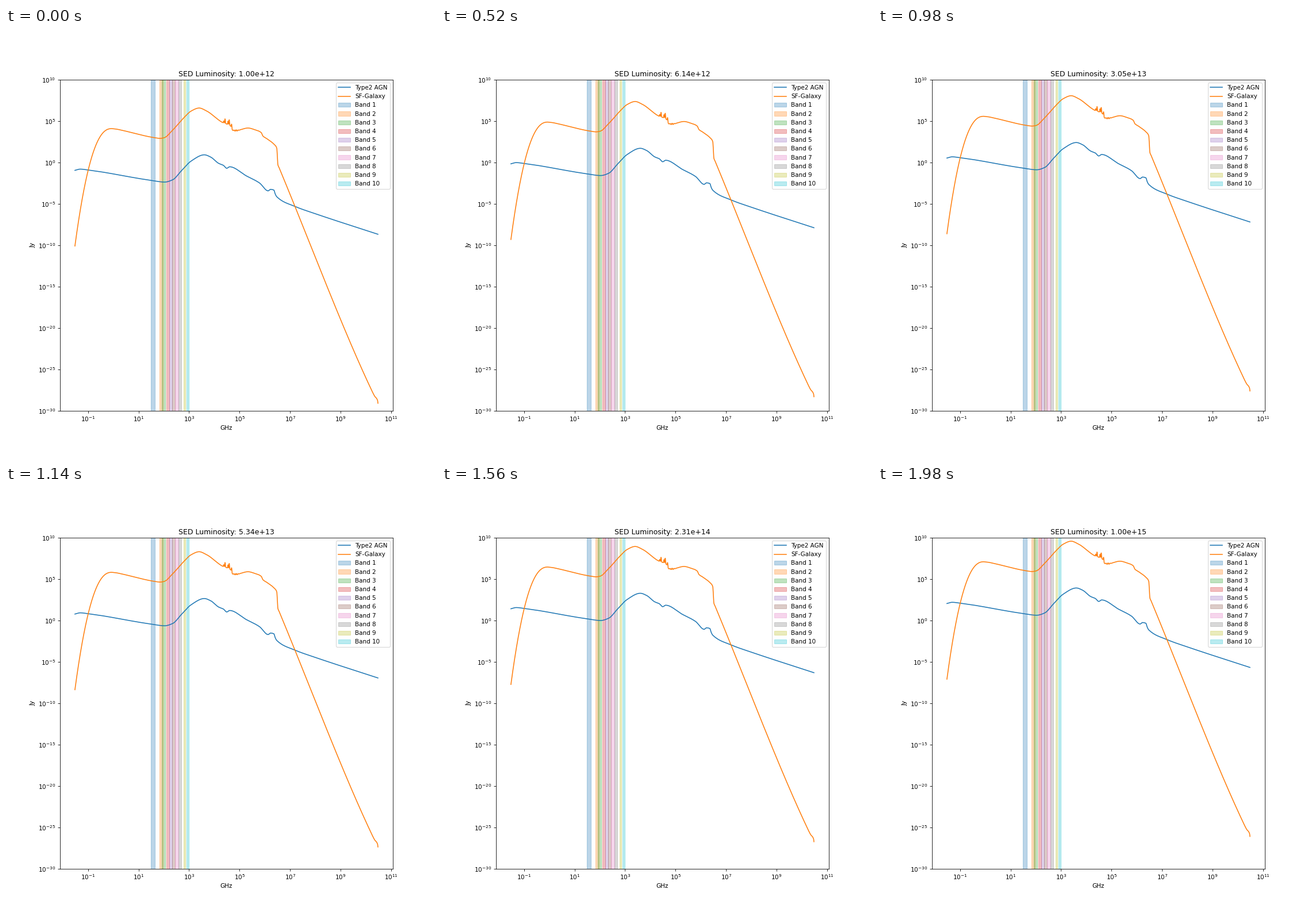
A matplotlib script for the animation above (2 s loop, 748 by 748 pixels).

```python
import numpy as np
import matplotlib.pyplot as plt
from matplotlib.animation import FuncAnimation

SIZE, INCHES = 748, 10
FRAMES, INTERVAL = 100, 20
LEFT, RIGHT, BOTTOM, TOP = 0.125, 0.9, 0.11, 0.88
XLIM = (-2.1232, 11.0768)   # log10 GHz
YLIM = (-30, 10)            # log10 Jy

# Receiver bands in GHz
BANDS = [(31, 45), (67, 90), (84, 116), (125, 163), (163, 211),
         (211, 275), (275, 373), (385, 500), (602, 720), (787, 950)]

# Turning points of both spectra at 1e12, in stage pixels
AGN = [(119.9, 247.6), (129, 245.5), (143, 247), (252, 265), (276, 268),
       (290, 264), (305, 248.5), (322, 231.5), (345, 220.6), (356, 224.5),
       (370, 235.5), (378, 238.8), (384, 244), (389, 241.4), (418, 257.2),
       (441, 269.6), (456, 283.3), (460, 280.7), (466, 282), (468, 288),
       (471, 293.5), (503, 310.5), (540, 323.7), (647, 358.8)]
GALAXY = [(184, 175), (192, 175.9), (202, 178), (259, 190.9), (268, 192),
          (275, 190.9), (290, 177.5), (310, 155.5), (322, 144.5),
          (336, 139.2), (348, 143.8), (376, 164), (391, 171), (394, 177.7),
          (400, 178.3), (421, 174), (433, 177), (444, 182), (447, 188),
          (453, 192), (466, 202), (471, 209), (473, 238), (475, 242.8),
          (635, 628), (641, 640), (646.5, 648.5), (647, 652.8)]

# Dust emission lines: wavelength in micrometres, height in dex
LINES = [(12.7, 0.25), (11.3, 0.56), (8.6, 0.4), (7.7, 0.65), (6.2, 0.5)]
LIGHT = 2.998e5             # GHz times micrometres


def spline(q, knots):
    """Monotone cubic curve through the knots."""
    x, y = np.array(knots, float).T
    h = np.diff(x)
    s = np.diff(y) / h
    m = np.concatenate([s[:1], np.zeros(len(s) - 1), s[-1:]])
    k = np.flatnonzero(s[:-1] * s[1:] > 0)
    a, b = h[k] + 2 * h[k + 1], 2 * h[k] + h[k + 1]
    m[k + 1] = (a + b) / (a / s[k] + b / s[k + 1])
    i = np.clip(np.searchsorted(x, q, side="right") - 1, 0, len(s) - 1)
    t = (q - x[i]) / h[i]
    return (y[i] + t * t * (3 - 2 * t) * (y[i + 1] - y[i])
            + t * (1 - t) * h[i] * ((1 - t) * m[i] - t * m[i + 1]))


def to_log(x, y):
    """Stage pixels to (log10 GHz, log10 Jy)."""
    u = (x / SIZE - LEFT) / (RIGHT - LEFT)
    v = (1 - y / SIZE - BOTTOM) / (TOP - BOTTOM)
    return (XLIM[0] + u * (XLIM[1] - XLIM[0]),
            YLIM[0] + v * (YLIM[1] - YLIM[0]))


def agn_spectrum(x):
    return to_log(x, spline(x, AGN))


def galaxy_spectrum(x):
    x0, y0 = GALAXY[0]
    rise = 203.5 * (np.maximum(x0 - x, 0) / 64) ** 2.33
    ripple = -1.3 * (np.cos(2 * np.pi * (x - 400.2) / 3.5)
                     * np.exp(-((x - 400) / 4) ** 2))
    f, jy = to_log(x, spline(np.maximum(x, x0), GALAXY) + rise + ripple)
    for wave, height in LINES:
        jy += height * np.exp(-((f - np.log10(LIGHT / wave)) / 0.015) ** 2)
    return f, jy


fig = plt.figure(figsize=(INCHES, INCHES), dpi=SIZE / INCHES)
ax = fig.add_axes([LEFT, BOTTOM, RIGHT - LEFT, TOP - BOTTOM])
ax.set_xscale("log")
ax.set_yscale("log")

px = np.linspace(AGN[0][0], AGN[-1][0], 2200)
log_lum = np.linspace(12, 15, FRAMES)
spectra = []
for name, spectrum in (("Type2 AGN", agn_spectrum),
                       ("SF-Galaxy", galaxy_spectrum)):
    f, jy = spectrum(px)
    line, = ax.plot(10 ** f, 10 ** jy, label=name)
    spectra.append((line, jy))
for n, (lo, hi) in enumerate(BANDS):
    ax.axvspan(lo, hi, color=f"C{n}", alpha=0.3, label=f"Band {n + 1}")

ax.set_xlim(10 ** XLIM[0], 10 ** XLIM[1])
ax.set_ylim(10.0 ** YLIM[0], 10.0 ** YLIM[1])
ax.set_xticks(10.0 ** np.arange(-1, 12, 2))
ax.set_yticks(10.0 ** np.arange(-30, 11, 5))
ax.minorticks_off()
ax.set_xlabel("GHz")
ax.set_ylabel("Jy")
ax.legend(loc="upper right")
title = ax.set_title("")


def update(i):
    for line, jy in spectra:
        line.set_ydata(10 ** (jy + log_lum[i] - log_lum[0]))
    title.set_text(f"SED Luminosity: {10 ** log_lum[i]:.2e}")
    return [line for line, _ in spectra] + [title]


anim = FuncAnimation(fig, update, frames=FRAMES, interval=INTERVAL,
                     repeat=True, repeat_delay=0)
plt.show()
```
